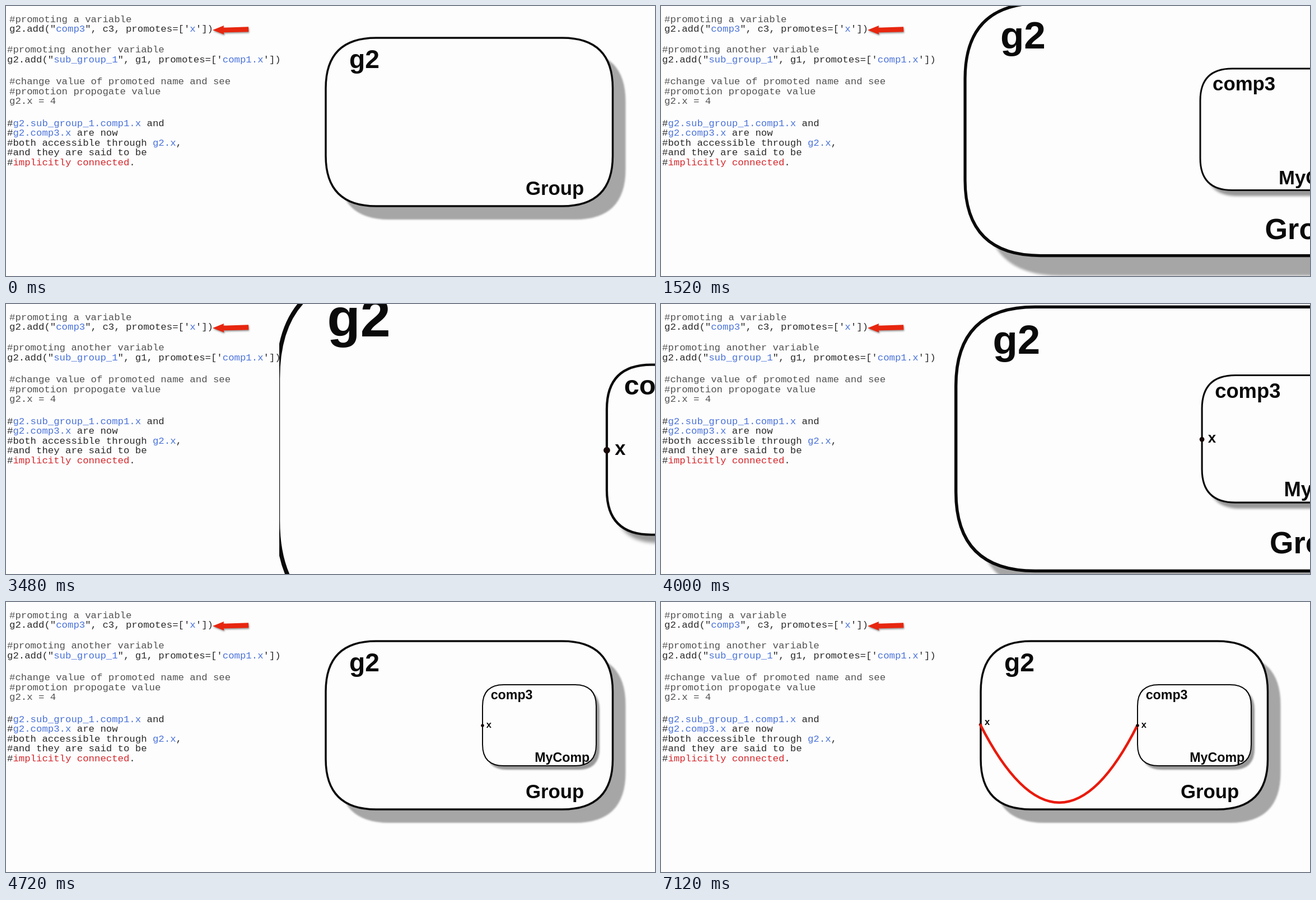
Recreate the animation shown at these times as an HTML page with a canvas. Size 1159x483 px, loop 8000 ms.

```html
<!DOCTYPE html>
<html lang="en">
<head>
<meta charset="utf-8">
<style>
html, body { margin: 0; width: 100%; height: 100%; overflow: hidden; background: #fdfdfd; }
canvas { display: block; }
</style>
</head>
<body>
<canvas id="stage" width="1159" height="483"></canvas>
<script>
const ctx = document.getElementById('stage').getContext('2d');
const LOOP = 8000, STEP = 40, PAPER = '#fdfdfd', INK = '#0a0a0a';
const COLORS = { k: '#2a2a2a', g: '#525252', b: '#4a72da', r: '#d6262b' };

// x, baseline, then pairs of colour key and text
const CODE = [
  [6, 29, 'g', '#promoting a variable'],
  [6, 46, 'k', 'g2.add("', 'b', 'comp3', 'k', '", c3, promotes=[\'', 'b', 'x', 'k', '\'])'],
  [2, 83, 'g', '#promoting another variable'],
  [2, 101, 'k', 'g2.add("', 'b', 'sub_group_1', 'k', '", g1, promotes=[\'', 'b', 'comp1.x', 'k', '\'])'],
  [6, 139.5, 'g', '#change value of promoted name and see'],
  [6, 157.5, 'g', '#promotion propogate value'],
  [6, 175, 'g', 'g2.x = 4'],
  [2, 214.5, 'k', '#', 'b', 'g2.sub_group_1.comp1.x', 'k', ' and'],
  [2, 232, 'k', '#', 'b', 'g2.comp3.x', 'k', ' are now'],
  [2, 249.5, 'k', '#both accessible through ', 'b', 'g2.x', 'k', ','],
  [2, 267, 'k', '#and they are said to be'],
  [2, 284.5, 'k', '#', 'r', 'implicitly connected', 'k', '.']
];

// Camera keys: time, scale, left and top of the group
const CAMERA = [
  [0, 1, 571, 57], [1080, 1, 571, 57], [1160, 1.09, 571, 41],
  [1520, 1.5, 543, -5], [1880, 1.92, 498, -40], [2160, 2.22, 476, -69],
  [3360, 2.22, 476, -69], [4560, 1, 571, 70], [LOOP, 1, 571, 70]
];

const progress = (t, from, to) => Math.min(1, Math.max(0, (t - from) / (to - from)));

function camera(t) {
  const i = CAMERA.findIndex(key => key[0] > t);
  const a = CAMERA[i - 1], b = CAMERA[i], p = progress(t, a[0], b[0]);
  return [1, 2, 3].map(n => a[n] + (b[n] - a[n]) * p);
}

// Box with its top left at the origin and parabolic corners
function box(w, h, r, line, scale, shadow) {
  ctx.beginPath();
  ctx.moveTo(r, 0);
  ctx.lineTo(w - r, 0);
  ctx.quadraticCurveTo(w, 0, w, r);
  ctx.lineTo(w, h - r);
  ctx.quadraticCurveTo(w, h, w - r, h);
  ctx.lineTo(r, h);
  ctx.quadraticCurveTo(0, h, 0, h - r);
  ctx.lineTo(0, r);
  ctx.quadraticCurveTo(0, 0, r, 0);
  ctx.closePath();
  ctx.save();
  ctx.shadowColor = shadow.color;
  ctx.shadowOffsetX = shadow.x * scale;
  ctx.shadowOffsetY = shadow.y * scale;
  ctx.shadowBlur = shadow.blur * scale;
  ctx.fillStyle = PAPER;
  ctx.fill();
  ctx.restore();
  ctx.strokeStyle = INK;
  ctx.lineWidth = line;
  ctx.stroke();
}

function label(text, x, y, size) {
  ctx.font = `bold ${size}px "Liberation Sans", Arial, sans-serif`;
  ctx.fillStyle = INK;
  ctx.fillText(text, x, y);
}

function dot(x, y, color) {
  ctx.beginPath();
  ctx.arc(x, y, 2.8, 0, Math.PI * 2);
  ctx.fillStyle = color;
  ctx.fill();
}

function component(t, scale) {
  const away = 1 - progress(t, 180, 840);
  ctx.save();
  ctx.translate(280 + 308 * away, 78 - 290 * away);
  box(203, 145, 38, 2, scale, { x: 6, y: 7, blur: 3, color: '#989898' });
  label('comp3', 14.7, 25.7, 23.2);
  label('MyComp', 93.3, 138.2, 23.2);
  ctx.restore();
}

function wire(p) {
  if (!p) return;
  const length = 414;
  ctx.beginPath();
  ctx.moveTo(280, 150);
  ctx.quadraticCurveTo(141, 428, -1, 149);
  ctx.setLineDash([length * p, length * 2]);
  ctx.strokeStyle = '#ea1a0c';
  ctx.lineWidth = 4.5;
  ctx.stroke();
  ctx.setLineDash([]);
}

function scene(t) {
  const [scale, left, top] = camera(t);
  ctx.save();
  ctx.beginPath();
  ctx.rect(488, 0, 671, 483);
  ctx.clip();
  ctx.translate(left, top);
  ctx.scale(scale, scale);
  box(512.5, 301, 90, 3.5, scale, { x: 23, y: 24, blur: 3, color: '#a6a6a6' });
  label('g2', 42, 53.7, 46.2);
  label('Group', 357, 281.2, 34.8);
  if (t >= 200) component(t, scale);

  ctx.globalAlpha = progress(t, 6640, 6840);
  dot(-0.5, 149.5, '#5a0c08');
  label('x', 7, 150, 16.5);
  ctx.globalAlpha = 1;
  wire(progress(t, 5490, 6840));
  ctx.globalAlpha = progress(t, 1900, 2120);
  dot(280, 151, '#180808');
  label('x', 286.8, 155, 16.5);
  ctx.restore();
}

function code() {
  ctx.font = '17.33px "Liberation Mono", "Courier New", monospace';
  for (const [left, y, ...parts] of CODE) {
    let x = left;
    for (let i = 0; i < parts.length; i += 2) {
      ctx.fillStyle = COLORS[parts[i]];
      ctx.fillText(parts[i + 1], x, y);
      x += ctx.measureText(parts[i + 1]).width;
    }
  }
}

function arrow() {
  ctx.save();
  ctx.shadowColor = 'rgba(0,0,0,.4)';
  ctx.shadowOffsetX = 1;
  ctx.shadowOffsetY = 2;
  ctx.shadowBlur = 3;
  ctx.fillStyle = '#e8260f';
  ctx.beginPath();
  ctx.moveTo(369, 43);
  ctx.lineTo(389, 35);
  ctx.lineTo(388.5, 38.7);
  ctx.lineTo(433, 37.3);
  ctx.lineTo(433.3, 46.2);
  ctx.lineTo(388.8, 47.2);
  ctx.lineTo(389.5, 51);
  ctx.fill();
  ctx.restore();
}

function draw() {
  const now = performance.now() % LOOP;
  ctx.fillStyle = PAPER;
  ctx.fillRect(0, 0, 1159, 483);
  scene(now - now % STEP);
  code();
  arrow();
  requestAnimationFrame(draw);
}
draw();
</script>
</body>
</html>
```
